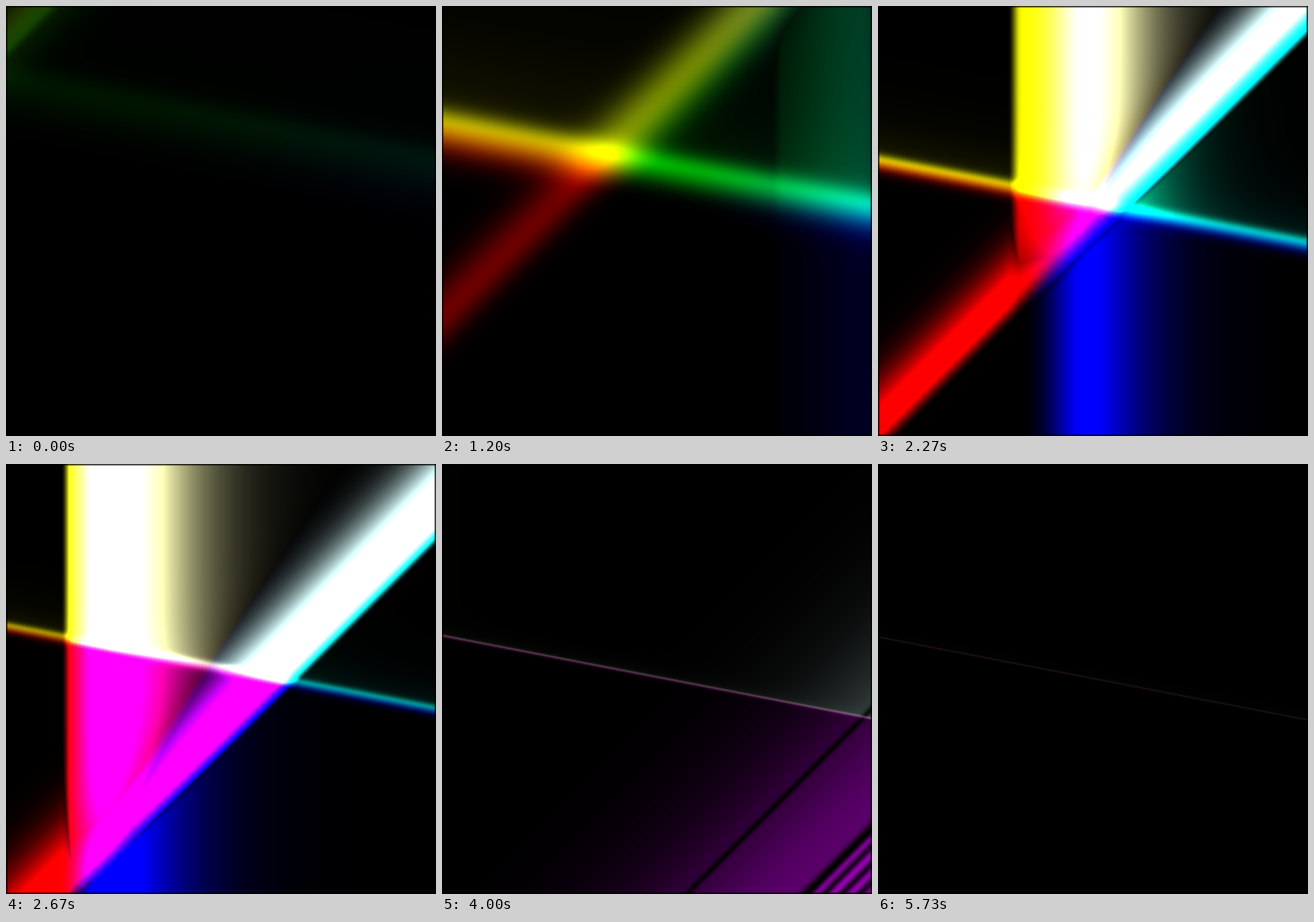
These frames come from a looping animation (480x480 px, 5.99 s). An HTML page with a canvas:

```html
<!DOCTYPE html>
<html lang="en">
<head>
<meta charset="utf-8">
<title>Crossing light beams</title>
<style>
html, body { margin: 0; width: 100%; height: 100%; overflow: hidden; background: #000; }
canvas { display: block; width: 100vw; height: 100vh; }
</style>
</head>
<body>
<canvas id="stage" width="480" height="480"></canvas>
<script>
const SIZE = 480, LOOP = 5990, STEP = 200 / 3, LAST = 86;
const SLOPE = 0.193, SUB = 4, PAD = 94;

// Key points of the diagonal beam along x + y; times in seconds.
const TIMES = [0, 1.2, 1.87, 2.67, 3.2, 4];
const CENTRE = [45, 350, 436, 545, 690, 900];
const FRONT = [55, 470, 478, 562, 724, 990];
const RED_END = [38, 380, 438, 552, 745, 1010];

const clamp = v => Math.max(0, Math.min(1, v));
const bell = d => Math.exp(-d * d);
const rise = (x, mid, half) => {
  const k = clamp((x - mid) / (2 * half) + .5);
  return k * k * (3 - 2 * k);
};
const fall = (x, mid, half) => 1 - rise(x, mid, half);
const mix = (p, q) => Math.max(p, q) - .3 * Math.min(p, q);

// Monotone cubic through key values.
function ease(row, t) {
  const n = TIMES.length;
  let i = 0;
  while (i < n - 2 && t >= TIMES[i + 1]) i++;
  const slope = j => (row[j + 1] - row[j]) / (TIMES[j + 1] - TIMES[j]);
  const tangent = j => {
    if (j === 0) return slope(0);
    if (j === n - 1) return slope(n - 2);
    const a = slope(j - 1), b = slope(j);
    return a * b <= 0 ? 0 : 2 * a * b / (a + b);
  };
  const h = TIMES[i + 1] - TIMES[i], s = clamp((t - TIMES[i]) / h);
  const s2 = s * s, s3 = s2 * s;
  return row[i] * (2 * s3 - 3 * s2 + 1) + row[i + 1] * (3 * s2 - 2 * s3)
    + h * (tangent(i) * (s3 - 2 * s2 + s) + tangent(i + 1) * (s3 - s2));
}

// Shallow beam: sinks to its resting line while it narrows.
function shallow(t, lag) {
  const pos = 193 - 111 * lag;
  const amp = 1.1 * (t < 1.9 ? bell((t - 1.9) / 1.23) : Math.exp((1.9 - t) / 1.6));
  const up = Math.min(18, 1 + 32 * lag), down = 1 + 54 * lag;
  return {
    light(v) {
      const d = v - pos;
      if (d > 0) return amp * bell(d / down);
      return amp * (.85 * bell(d / up) + .15 * Math.exp(d / (4 * up)));
    },
    green: v => fall(v, pos + 25 * lag, 1 + 55 * lag)
  };
}

// Upright beam: speeds up to the left behind a hard edge.
function upright(t, lag) {
  const pos = 640 - 100 * t - 36 * t * t, edge = 623 - 208 * t;
  const amp = 1.9 * bell(t - 2.65), tail = 12 + 25 * t;
  const blueStart = Math.min(400, 862 - 292 * t), soft = 2 + 300 * lag ** 1.2;
  return {
    light(x) {
      const d = x - pos;
      const body = d < 0 ? bell(d / 95) : Math.exp(-((d / tail) ** 1.4));
      return amp * body * rise(x, edge, 7);
    },
    blue: x => rise(x, blueStart, soft)
  };
}

// Diagonal beam: a hard front and dark grooves that trail it.
function diagonal(t, lag) {
  const pos = ease(CENTRE, t), front = ease(FRONT, t), redEnd = ease(RED_END, t);
  const amp = 1.9 * bell((t - 2.6) / 1.15) + .25 * lag * lag;
  const width = 45 + .55 * t ** 4, rest = .4 * bell(t);
  const groove = 685 + 84 * (t - 3.2);
  return {
    light(u) {
      const past = u - groove - 133;
      let i = amp * bell((u - pos) / width);
      i *= rest + (1 - rest) * fall(u, front, 9);
      i *= (1 - .85 * bell((u - groove) / 5)) * (1 - .95 * bell(past / 8));
      if (past > 0) i *= 1.6 * (.6 + .4 * Math.cos((past - 30) * Math.PI / 10));
      return i;
    },
    red: u => fall(u, redEnd, 8 + 60 * lag)
  };
}

const ctx = document.getElementById("stage").getContext("2d");
const image = ctx.createImageData(SIZE, SIZE);
const px = image.data;
const sample = (n, fn) => Float32Array.from({ length: n }, (_, i) => fn(i));
const rim = sample(SIZE, i => clamp((Math.min(i, SIZE - 1 - i) + .5) / 2.5));

function draw(t) {
  const lag = Math.exp(-.45 * t ** 1.6);
  const a = shallow(t, lag), v = upright(t, lag), c = diagonal(t, lag);
  const rows = (SIZE + PAD) * SUB + 1, offset = i => i / SUB - PAD;
  const A = sample(rows, i => a.light(offset(i)));
  const G = sample(rows, i => a.green(offset(i)));
  const V = sample(SIZE, v.light), B = sample(SIZE, v.blue);
  const C = sample(2 * SIZE, c.light), R = sample(2 * SIZE, c.red);
  for (let y = 0, o = 0; y < SIZE; y++) {
    for (let x = 0; x < SIZE; x++, o += 4) {
      const u = x + y, i = Math.round((y - SLOPE * x + PAD) * SUB);
      const level = 255 * rim[x] * rim[y];
      px[o] = level * Math.min(1, R[u] * (mix(V[x], .85 * C[u]) + A[i]));
      px[o + 1] = level * Math.min(1, G[i] * (mix(V[x], C[u]) + A[i]));
      px[o + 2] = level * Math.min(1, B[x] * (mix(.72 * V[x], C[u]) + .9 * A[i]));
      px[o + 3] = 255;
    }
  }
  ctx.putImageData(image, 0, 0);
}

const start = performance.now();
let shown = -1;
function tick() {
  const t = (performance.now() - start) % LOOP;
  const step = Math.min(LAST, Math.floor((t + 4) / STEP));
  if (step !== shown) {
    shown = step;
    draw(step * STEP / 1000);
  }
  requestAnimationFrame(tick);
}
tick();
</script>
</body>
</html>
```
